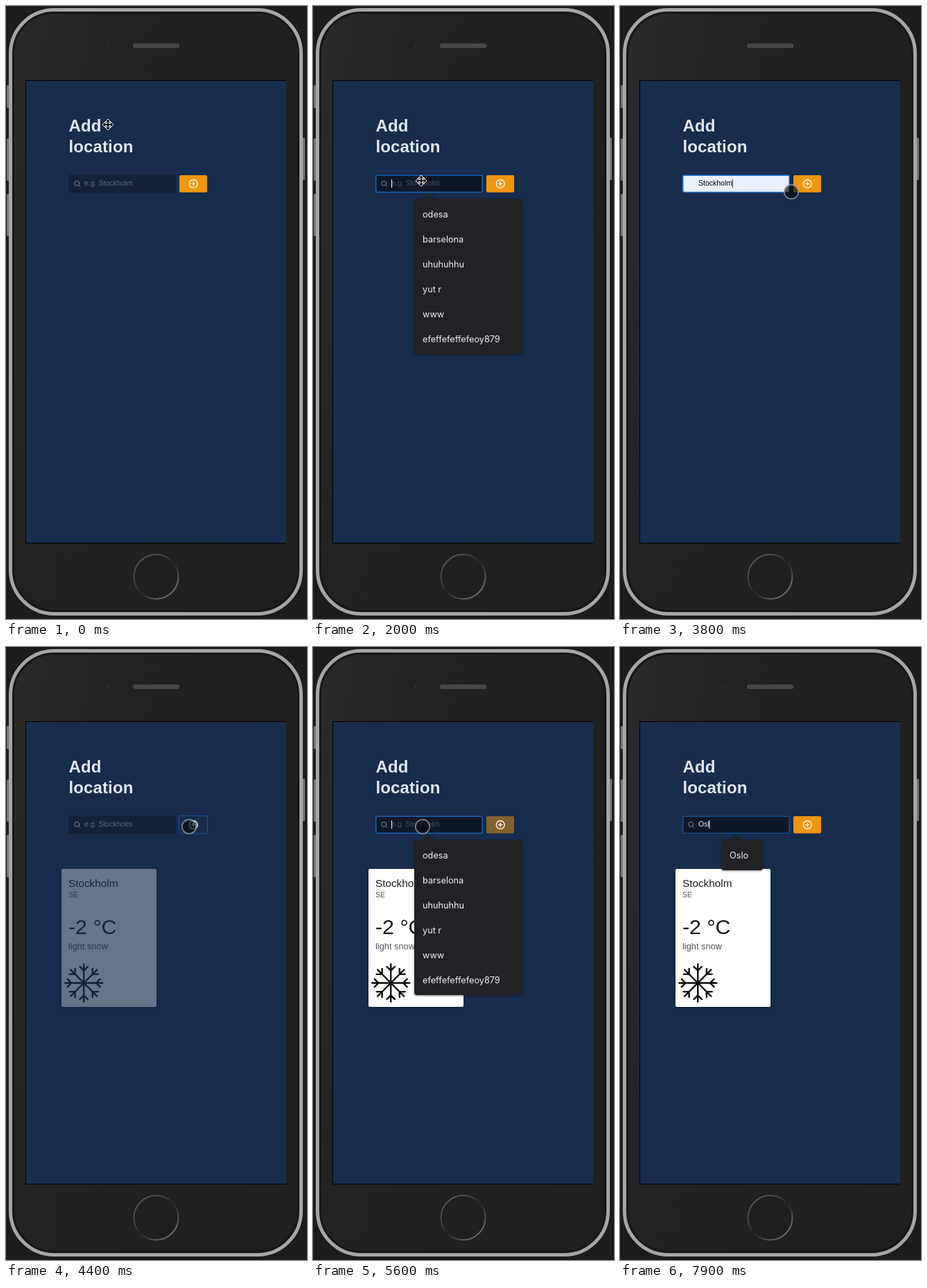
An HTML page that plays this animation: 434 px wide and 884 px high, repeating every 8 s.

```html
<!DOCTYPE html>
<html lang="en">
<head>
<meta charset="utf-8">
<title>Add location</title>
<style>
html, body { margin: 0; width: 100%; height: 100%; overflow: hidden; background: #1c1c1e; }
svg { display: block; width: 434px; height: 884px; }
text { font-family: "Liberation Sans", Arial, sans-serif; white-space: pre; }
#menu text { font: 400 12.7px Inter, sans-serif; fill: #f1f1f2; }
</style>
</head>
<body>
<svg viewBox="0 0 434 884">
  <defs>
    <linearGradient id="body" x1="0" y1="0" x2="1" y2="0.35">
      <stop offset="0" stop-color="#2b2b2c"/>
      <stop offset="0.3" stop-color="#222223"/>
      <stop offset="1" stop-color="#1f1f1f"/>
    </linearGradient>
    <linearGradient id="home" x1="0.1" y1="0.1" x2="0.85" y2="0.95">
      <stop offset="0" stop-color="#5c5c5c"/>
      <stop offset="0.38" stop-color="#3a3a3a"/>
      <stop offset="0.5" stop-color="#232323"/>
      <stop offset="0.62" stop-color="#333"/>
      <stop offset="1" stop-color="#7b7b7b"/>
    </linearGradient>
    <pattern id="mesh" width="3" height="3" patternUnits="userSpaceOnUse">
      <rect width="3" height="3" fill="#333"/>
      <circle cx="0.8" cy="0.8" r="0.75" fill="#6c6c6c"/>
      <circle cx="2.3" cy="2.3" r="0.75" fill="#6c6c6c"/>
    </pattern>
    <filter id="shade" x="-20%" y="-20%" width="140%" height="140%">
      <feDropShadow dx="0" dy="1" stdDeviation="1.5" flood-opacity="0.45"/>
    </filter>
  </defs>

  <rect width="434" height="884" fill="#1c1c1e"/>
  <g fill="#77777a">
    <rect x="1" y="114" width="5" height="33" rx="1.5"/>
    <rect x="1" y="191" width="5" height="61" rx="1.5"/>
    <rect x="1" y="271" width="5" height="61" rx="1.5"/>
    <rect x="426" y="190" width="5" height="61" rx="1.5"/>
  </g>
  <rect x="6.5" y="5.5" width="419" height="871" rx="63" fill="#171718" stroke="#a6a5a7" stroke-width="5"/>
  <rect x="12" y="11" width="408" height="860" rx="58" fill="url(#body)"/>
  <circle cx="148" cy="57.5" r="3.2" fill="#18181c" stroke="#2c2c30"/>
  <circle cx="148" cy="57.5" r="1.2" fill="#45455a"/>
  <rect x="183" y="54" width="67" height="6.5" rx="3.2" fill="url(#mesh)"/>
  <circle cx="216.5" cy="823" r="32" fill="#1f1f1f" stroke="url(#home)" stroke-width="2"/>
  <rect x="28" y="107" width="376" height="668" fill="#000"/>
  <rect x="29" y="108" width="375" height="666" fill="#182c4d"/>

  <g font-size="24" font-weight="700" fill="#e2e8f0" letter-spacing="0.1">
    <text x="90.6" y="181">Add</text>
    <text x="90.6" y="211">location</text>
  </g>

  <rect id="field" rx="2"/>
  <g id="lens" fill="none" stroke="#8791a3" stroke-width="0.95" stroke-linecap="round">
    <circle cx="102.2" cy="255.8" r="3.4"/>
    <path d="M104.8 258.4l2.1 2.1"/>
  </g>
  <text id="value" x="113" y="259.3" font-size="10.5"></text>
  <rect id="caret" y="250" width="1" height="12"/>

  <rect id="button" x="250" y="244" width="40" height="24.7" rx="2" fill="#ee960e"/>
  <rect id="ring" x="249.5" y="243.5" width="41" height="25.5" rx="2.5" fill="none" stroke="#17559b"/>
  <g id="plus" fill="none" stroke="#fff" stroke-width="1.3" stroke-linecap="round">
    <circle cx="270.2" cy="256.4" r="5.9"/>
    <path d="M267.6 256.4h5.2M270.2 253.8v5.2"/>
  </g>

  <g id="card">
    <rect x="80" y="320" width="137" height="199" rx="2.5" fill="#fff" filter="url(#shade)"/>
    <text x="90" y="346" font-size="15.3" fill="#17171a">Stockholm</text>
    <text x="90" y="361" font-size="10.5" fill="#555">SE</text>
    <text x="90" y="414" font-size="30.4" fill="#151517">-2 °C</text>
    <text x="90" y="436" font-size="12.8" fill="#505154">light snow</text>
    <g id="flake" transform="translate(112.2 484.5)" fill="none" stroke="#08080a" stroke-width="2.4" stroke-linecap="round" stroke-linejoin="round"></g>
  </g>

  <g id="menu">
    <g fill="#212225" filter="url(#shade)">
      <path d="M156 279l8-7.2q2.5-2 5 0l8 7.2z"/>
      <rect id="panel" x="146" y="278" rx="4"/>
    </g>
    <g id="items"></g>
  </g>

  <g id="move">
    <path d="M0-8l4 4h-2.6v2.6h2.6v-2.6l4 4-4 4v-2.6h-2.6v2.6h2.6l-4 4-4-4h2.6v-2.6h-2.6v2.6l-4-4 4-4v2.6h2.6v-2.6h-2.6z" fill="#0a0a0a" stroke="#fff" stroke-width="1" stroke-linejoin="round"/>
  </g>
  <circle id="touch" r="10.2" fill="#06090f" fill-opacity="0.66" stroke="#9aa1aa" stroke-opacity="0.8" stroke-width="1.7"/>
</svg>
<script>
const LOOP = 8000;
const $ = id => document.getElementById(id);
const set = (id, attrs) => { for (const k in attrs) $(id).setAttribute(k, attrs[k]); };
const show = (id, on) => set(id, { visibility: on ? 'visible' : 'hidden' });
const clamp = x => Math.max(0, Math.min(1, x));
const ramp = (t, from, to) => clamp((t - from) / (to - from));
const ease = x => x * x * (3 - 2 * x);
const within = (t, a, b) => t >= a && t < b;

const recent = { width: 156, words: ['odesa', 'barselona', 'uhuhuhhu', 'yut r', 'www', 'efeffefeffefeoy879'] };
const oWords = { width: 84, words: ['odesa', 'od', 'odessa', 'Oslo'] };
const oslo = { width: 60, words: ['Oslo'] };
const stockholm = { width: 102, words: ['Stockholm'] };

// Each step holds from its time until the next one.
const menus = [[0, null], [700, recent], [2200, stockholm], [3500, null], [5500, recent], [7000, oWords], [7500, oslo]];
const typing = [[0, ''], [2100, 'S'], [2300, 'St'], [2600, 'Sto'], [3500, 'Stockholm'], [4400, ''], [6900, 'O'], [7500, 'Os'], [7800, 'Osl']];
const arrowPath = [[100, 147, 171], [600, 156, 252]];
const touchPath = [[2800, 160, 262], [3150, 184, 300], [3500, 184, 300], [3800, 247, 268], [4050, 264, 259], [4800, 264, 259], [5200, 158, 259]];

const stepAt = (steps, t) => steps.filter(s => s[0] <= t).pop()[1];

function along(path, t) {
  const i = path.findIndex(p => p[0] > t);
  if (i === 0) return path[0].slice(1);
  if (i < 0) return path[path.length - 1].slice(1);
  const [a, b] = [path[i - 1], path[i]];
  const k = ease(ramp(t, a[0], b[0]));
  return [a[1] + (b[1] - a[1]) * k, a[2] + (b[2] - a[2]) * k];
}

function place(id, path, t) {
  const [x, y] = along(path, t);
  set(id, { transform: `translate(${x} ${y})` });
}

for (let a = 0; a < 360; a += 45)
  $('flake').innerHTML += `<path transform="rotate(${a})" d="M0 0V-27M-5.6-23.4L0-17.8L5.6-23.4"/>`;

let openMenu;
function drawMenu(menu) {
  if (menu === openMenu) return;
  openMenu = menu;
  show('menu', menu);
  if (!menu) return;
  set('panel', { width: menu.width, height: menu.words.length * 36 + 8 });
  $('items').innerHTML = menu.words.map((w, i) => `<text x="158" y="${305 + i * 36}">${w}</text>`).join('');
}

function drawField(t) {
  const focused = within(t, 700, 4100) || t >= 5500;
  const filled = within(t, 3500, 4400);
  const value = stepAt(typing, t);
  const text = $('value');
  const edge = focused ? 0.75 : 0;
  set('field', {
    x: 90 + edge, y: 243.5 + edge, width: 154.8 - 2 * edge, height: 25.7 - 2 * edge,
    fill: filled ? '#e8f0fe' : focused ? '#0e1728' : '#142037',
    stroke: !focused ? 'none' : filled ? '#2a7ad0' : value ? '#174d8e' : '#1663b3',
    'stroke-width': 1.5
  });
  show('lens', !filled);
  const label = value || 'e.g. Stockholm';
  if (text.textContent !== label) text.textContent = label;
  set('value', { fill: filled ? '#08080a' : value ? '#dfe5ee' : focused ? '#465063' : '#5d6a80' });
  const last = typing.filter(s => s[0] <= t).pop()[0];
  const since = t - Math.max(last, t >= 5500 ? 5500 : 700);
  set('caret', {
    x: value ? 113 + text.getComputedTextLength() - 0.4 : 113,
    fill: filled ? '#222' : '#fff'
  });
  show('caret', focused && since % 1000 < 550);
}

function draw(t) {
  drawField(t);
  drawMenu(stepAt(menus, t));

  const clear = ramp(t, 4100, 4300) - ramp(t, 5500, 5700);
  set('button', { opacity: 1 - clear });
  show('ring', within(t, 4100, 5500));

  set('card', { opacity: ramp(t, 4350, 4500) });
  show('card', t >= 4350);

  place('move', arrowPath, t);
  show('move', t < 2100);
  place('touch', touchPath, t);
  show('touch', within(t, 2800, 6900));
}

const start = performance.now();
function tick() {
  draw((performance.now() - start) % LOOP);
  requestAnimationFrame(tick);
}
tick();
</script>
</body>
</html>
```
